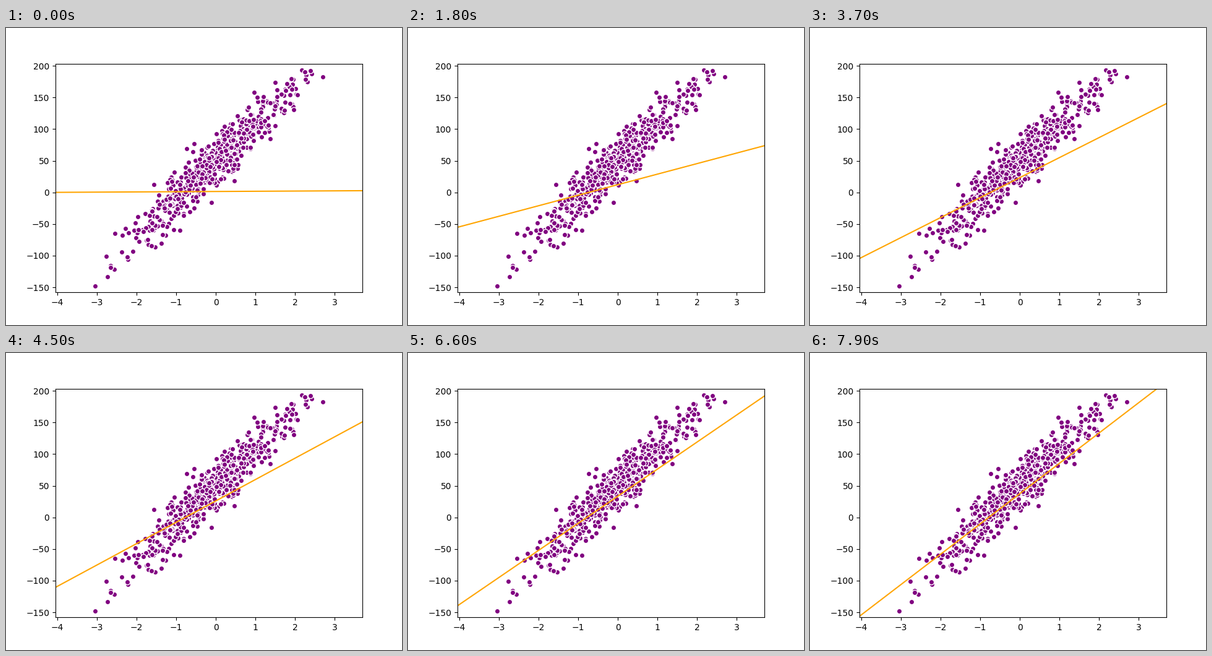
Recreate the animation shown at these times as a matplotlib script. Size 640 px wide and 480 px high, loop 8 s.

```python
import numpy as np
import matplotlib.pyplot as plt
from matplotlib.animation import FuncAnimation

FRAMES, INTERVAL = 80, 100
COUNT, BIAS, NOISE = 600, 50, 20

# Noisy linear data, shuffled
rng = np.random.RandomState(0)
x = rng.standard_normal(COUNT)
trend = np.clip(100 * rng.uniform(), 54, 62)
y = BIAS + trend * x + rng.normal(scale=NOISE, size=COUNT)
order = np.arange(COUNT)
rng.shuffle(order)
x, y = x[order], y[order]

x_span = np.array([x.min() - 1, x.max() + 1])
y_span = (y.min() - 10, y.max() + 10)

# Key points of the training: step, slope, intercept
STEP, SLOPE, INTERCEPT = np.transpose([
    (0, 0.34, 1.4), (11, 11.7, 7.4), (25, 21.6, 17), (37, 31.6, 23.4),
    (54, 36.2, 29.1), (66, 42.8, 33.5), (79, 47.9, 37.6)])


def fit_at(step):
    slope = np.interp(step, STEP, SLOPE)
    return slope * x_span + np.interp(step, STEP, INTERCEPT)


plt.rcParams["font.family"] = "DejaVu Sans"
fig, ax = plt.subplots(figsize=(6.4, 4.8), dpi=100)
ax.scatter(x, y, color="purple", edgecolors="white")
line, = ax.plot(x_span, fit_at(0), color="orange")
ax.set_xlim(x_span)
ax.set_ylim(y_span)


def update(step):
    line.set_ydata(fit_at(step))
    return line,


anim = FuncAnimation(fig, update, frames=FRAMES, interval=INTERVAL,
                     repeat=True, repeat_delay=0)
plt.show()
```
